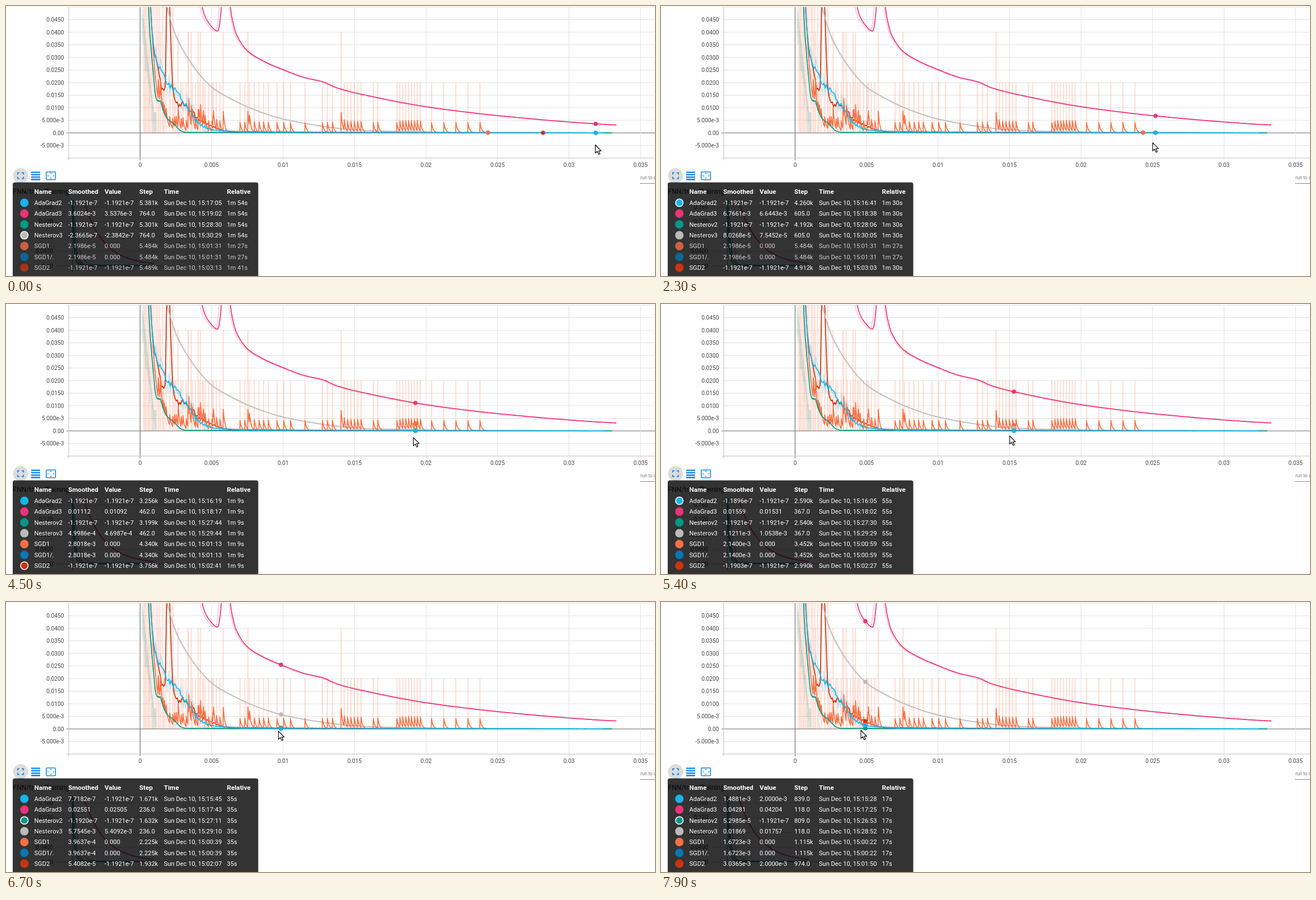
An HTML page that plays this animation: 1159x483 px, repeating every 8000 ms.

```html
<!DOCTYPE html>
<html lang="en">
<head>
<meta charset="utf-8">
<title>Training loss chart</title>
<style>
html, body { margin: 0; width: 100%; height: 100%; overflow: hidden; background: #fff; }
svg { display: block; width: 1159px; height: 483px; font-family: Roboto, Arial, sans-serif; }
.axis { font-size: 10.2px; fill: #444; }
.head { font-size: 11.7px; font-weight: 700; fill: #fff; }
.row { font-size: 11.1px; fill: #fff; }
.line { fill: none; stroke-linejoin: round; }
</style>
</head>
<body>
<svg id="stage" viewBox="0 0 1159 483"></svg>
<script>
const stage = document.getElementById('stage');
const X0 = 239.5, Y0 = 227, TICK_X = 127.67, TICK_Y = 22.5;
const PX_PER_SEC = 7.0925, PX_PER_UNIT = 4500;
const COL = { blue: '#14b6ee', pink: '#ee3377', teal: '#009988', gray: '#bbbbbb', orange: '#ff7043', navy: '#0077bb', red: '#cc3311' };

let seed = 11;
const rnd = () => (seed = (seed * 16807) % 2147483647) / 2147483647;
const lerp = (a, b, u) => a + (b - a) * u;
const pairs = s => s.trim().split(/\s+/).map(p => p.split(',').map(Number));

// Smooth curve through a few points, with optional jitter that fades near zero
function curve(pts, jitter = 0) {
  const out = [];
  const slope = i => {
    const a = pts[Math.max(0, i - 1)], b = pts[Math.min(pts.length - 1, i + 1)];
    return (b[1] - a[1]) / (b[0] - a[0]);
  };
  for (let i = 0; i < pts.length - 1; i++) {
    const [a, b] = [pts[i], pts[i + 1]];
    const w = b[0] - a[0], n = Math.max(6, Math.round(w / 2));
    for (let k = 0; k < n; k++) {
      const u = k / n, v = 1 - u;
      const y = a[1] * v * v * (1 + 2 * u) + b[1] * u * u * (3 - 2 * u) + w * u * v * (slope(i) * v - slope(i + 1) * u);
      out.push([a[0] + w * u, y + (rnd() - .5) * jitter * Math.min(1, Math.abs(Y0 - y) / 30)]);
    }
  }
  out.push(pts[pts.length - 1]);
  return out;
}

function yAt(pts, x) {
  const i = pts.findIndex(p => p[0] >= x);
  if (i <= 0) return pts[i < 0 ? pts.length - 1 : 0][1];
  const [a, b] = [pts[i - 1], pts[i]];
  return lerp(a[1], b[1], (x - a[0]) / (b[0] - a[0]));
}

// Loss readings of the two slow runs, which also shape their curves
const KEY_X = [1053, 957, 835.5, 731, 630.2, 491, 365];
const readings = (head, list) => curve([...pairs(head), ...list.map((v, i) => [KEY_X[i], Y0 - v * PX_PER_UNIT])]
  .sort((a, b) => a[0] - b[0]));

const pink = readings('347,-25 350.5,2 356,20 375,44 380,40 384.5,2 391,-100 400.8,2 405,28 412,52 430,79 460,98.5 530,127 567,136 590,146 1090,212.8',
  [3.6024e-3, 5.2323e-3, 7.9119e-3, .01112, .01559, .02551, .04281]);
const gray = readings('286,-8 288,2 297,35 310,67 335,108 400,165 440,184 565,215 1080,227',
  [-2.3665e-7, 6.0284e-5, 1.3203e-4, 4.9986e-4, 1.1211e-3, 5.7545e-3, .01869]);
const teal = curve(pairs('254,-10 257,50 262,108 268,165 276,170 284,196 300,211 314,224 340,226 1082.5,226.8'), 4);
const blue = curve(pairs('257,-12 261,48 267,90 287,135 303,152 320,176 340,205 365,220.3 395,223.5 440,226.4 1067,226.8'), 10);
const red = curve(pairs('257,-12 262,62 268,98 284,142 287,2 289.5,-14 292.5,4 298,150 320,176 346,204 365,213.3 385,222 430,225 959,226.8'), 9);

// Spikes: [x, size]; trains are first x, gap, count
const spikes = [[388, 2], [432, 2], [598.5, 2]];
for (let x = 272; x < 384; x += 1 + rnd() * 5.5) spikes.push([x, rnd() < .25 ? 2 : 1]);
for (const [x, gap, n] of [[418, 8.4, 7], [484, 12, 3], [534, 0, 1], [565, 9, 3], [604, 6, 6], [656, 8, 2], [698, 5.2, 9], [760, 21.6, 5]])
  for (let i = 0; i < n; i++) spikes.push([x + i * gap, 1]);
spikes.sort((a, b) => a[0] - b[0]);

// Each spike lifts the smoothed line, which then decays
const orange = [];
for (let x = 258, h = 0, i = 0; x <= 861; x += .5) {
  h *= Math.exp(-.5 / 2.8);
  while (i < spikes.length && spikes[i][0] <= x) h += 18 * spikes[i++][1];
  orange.push([x, Y0 - .3 - h - 240 * Math.exp((258 - x) / 10)]);
}

const path = (pts, color, extra = '') =>
  `<path class="line" d="M${pts.map(p => p[0].toFixed(1) + ' ' + p[1].toFixed(1)).join('L')}" stroke="${color}" stroke-width="1.7" ${extra}/>`;
const text = (x, y, s, cls, extra = '') => `<text x="${x}" y="${y}" class="${cls}" ${extra}>${s}</text>`;
const seg = (x1, y1, x2, y2, c, w = 1) => `<path d="M${x1} ${y1}L${x2} ${y2}" stroke="${c}" stroke-width="${w}"/>`;

function grid() {
  let s = '';
  for (let i = -2; i <= 10; i++) {
    const y = Y0 - i * TICK_Y, v = i * .005;
    s += seg(108, y, 1159, y, i ? '#e0e0e0' : '#999', i ? 1 : 1.4);
    const label = !i ? '0.00' : Math.abs(i) === 1 ? v.toExponential(3) : v.toFixed(4);
    if (i > -2 && i < 10) s += text(103.5, y + 3.6, label, 'axis', 'text-anchor="end"');
  }
  for (let i = -1; i <= 7; i++) {
    const x = X0 + i * TICK_X;
    s += seg(x, 2, x, 276, i ? '#e0e0e0' : '#888', i ? 1 : 1.5);
    if (i >= 0) s += text(x, 288, +(i * .005).toFixed(3), 'axis', 'text-anchor="middle"');
  }
  return s + seg(112, 2, 112, 276, '#ccc') + seg(108, 272, 1159, 272, '#ccc');
}

// Unsmoothed data, drawn pale
function faint() {
  let bars = spikes.map(([x, n]) => `M${x.toFixed(1)} 227V${n > 1 ? 47 : 137}`).join('');
  for (let x = 246; x < 300; x += 2 + rnd() * (x - 240) / 9) bars += `M${x.toFixed(1)} 227V2`;
  let wash = '';
  for (let x = 243; x < 268; x += .8) {
    const top = Math.min(190, (x - 243) * 9);
    wash += `M${x} ${top}V${Math.min(Y0, top + 15 + rnd() * 55)}`;
  }
  const haze = [];
  for (let x = 262; x < 480; x += 1.6) {
    const y = yAt(blue, x);
    haze.push([x, Math.min(Y0, y + (rnd() - .5) * Math.min(40, (Y0 - y) * 1.6 + 3))]);
  }
  const shift = (pts, c, dx) => path(pts, c, `opacity=".25" transform="translate(${dx} .3)"`);
  return `<path d="${bars}" stroke="${COL.orange}" stroke-width="2.2" opacity=".21"/>` +
    `<path d="${wash}" stroke="${COL.teal}" opacity=".22"/>` +
    path(haze, COL.blue, 'opacity=".25"') + shift(gray, COL.gray, -2) +
    shift(pink.filter(p => p[0] < 386), COL.pink, -4) + shift(pink.filter(p => p[0] > 398), COL.pink, -2.5);
}

// Small chart that shows dimly below the tooltip
function miniChart() {
  let s = text(12.5, 336, 'FNN/train/Training', '', 'font-size="12" fill="#222"');
  for (let i = 0; i < 5; i++) {
    const v = .16 - i * .04, y = 359.5 + i * 26.4;
    s += text(84, y + 3.5, v > .09 ? v.toFixed(3) : v > .01 ? v.toFixed(4) : '0.00', 'axis', 'text-anchor="end"');
    s += seg(91, y, 292, y, i < 4 ? '#ddd' : '#999');
  }
  s += seg(118.5, 347, 118.5, 476, '#888');
  const fall = (x, k, c, end) => {
    const pts = [];
    for (let u = 0; u <= end - x; u += 2) pts.push([x + u, 464 - 117 * Math.exp(-u / k)]);
    return path(pts, c);
  };
  return s + fall(120, 8, COL.gray, 262) + fall(119, 5, COL.orange, 224) + fall(119, 4, COL.blue, 262) +
    fall(118, 3, COL.teal, 262) + fall(138, 36, COL.pink, 264);
}

const icons = `<circle cx="26" cy="303.5" r="13.5" fill="#dcdcdc"/>
<g fill="none" stroke="#1e88e5" stroke-width="1.8">
<path d="M20.8 301.5V298.3H24M28 298.3H31.2V301.5M31.2 305.5V308.7H28M24 308.7H20.8V305.5"/>
<path d="M45 297.5H61M45 301.8H61M45 306.1H61M45 310.4H61" stroke-width="2.6"/>
<rect x="71.8" y="296.8" width="16.6" height="14" rx="1" stroke-width="1.6"/></g>
<path d="M78.2 300L80.1 297.8 82 300ZM78.2 307.6L80.1 309.8 82 307.6ZM75.8 302L73.6 303.8 75.8 305.6ZM84.4 302L86.6 303.8 84.4 305.6Z" fill="#1e88e5"/>`;

// step: [per second, offset]; clock: wall time at zero, in seconds after 15:00
const FLOOR = -1.1921e-7;
const height = (pts, x) => (Y0 - yAt(pts, x)) / PX_PER_UNIT;
const accuracy = v => v > 1e-3 ? 2e-3 : FLOOR;
const sgd1 = {
  col: COL.orange, pts: orange, clock: 4.33, end: 860.8, step: [62.5, 9],
  smooth: (s, x) => x > 860 ? 2.1986e-5 : height(orange, x), value: () => 0
};
const runs = [
  { name: 'AdaGrad2', col: COL.blue, pts: blue, clock: 910.4, step: [46.82, 11],
    smooth: s => FLOOR + 1.4881e-3 * Math.exp((17.695 - s) / 2.394), value: accuracy },
  { name: 'AdaGrad3', col: COL.pink, pts: pink, clock: 1027.87, step: [6.66, .3],
    smooth: (s, x) => height(pink, x), value: v => v * .982 },
  { name: 'Nesterov2', col: COL.teal, pts: teal, clock: 1595.6, lag: .05, step: [46.3, -10],
    smooth: s => FLOOR + 5.3092e-5 * Math.exp((17.695 - s) / 1.1), value: () => FLOOR },
  { name: 'Nesterov3', col: COL.gray, pts: gray, clock: 1714.87, step: [6.66, .3],
    smooth: (s, x) => height(gray, x), value: v => v * (v > 0 ? .94 : 1.0075) },
  { name: 'SGD1', ...sgd1 },
  { name: 'SGD1/.', ...sgd1, col: COL.navy },
  { name: 'SGD2', col: COL.red, pts: red, clock: 92.35, end: 959, step: [53.91, 20],
    smooth: s => FLOOR + 5.376e-3 * Math.exp(-1.031e-4 * s ** 3), value: accuracy }
];
const ACTIVE = [3, 0, 6, 6, 0, 2, 2];

const num = v => v === 0 ? '0.000' : Math.abs(v) >= .01 ? v.toPrecision(4) : v.toExponential(4);
const count = v => (v = Math.round(v)) >= 1000 ? (v / 1000).toFixed(3) + 'k' : v.toFixed(1);
const two = n => String(Math.floor(n)).padStart(2, '0');
const clock = s => `Sun Dec 10, 15:${two(s / 60)}:${two(s % 60)}`;
const span = s => (s >= 60 ? Math.floor(s / 60) + 'm ' : '') + Math.floor(s % 60) + 's';

const COLS = { Name: 50.5, Smoothed: 111, Value: 176, Step: 238, Time: 282, Relative: 394.5 };
const rowY = i => 352 + i * 19.35;
const tableRow = (r, i) => `<g id="row${i}"><circle cx="32.8" cy="${rowY(i)}" r="6.8" fill="${r.col}" stroke-width="1.5"/>` +
  Object.values(COLS).map((x, k) => text(x, rowY(i) + 4, k ? '' : r.name, 'row')).join('') + '</g>';

stage.innerHTML = `<defs><clipPath id="plot"><rect x="112" y="2" width="1047" height="270"/></clipPath></defs>
${grid()}<g clip-path="url(#plot)">${faint()}
${[red, gray, orange, teal, pink, blue].map(pts => path(pts, runs.find(r => r.pts === pts).col)).join('')}
${runs.map((r, i) => `<circle id="dot${i}" r="3.8" fill="${r.col}"/>`).reverse().join('')}</g>
${icons}${text(1133, 309.5, 'run to download', '', 'font-size="8.3" fill="#777"')}${seg(1132, 317.5, 1159, 317.5, '#888')}
${miniChart()}<rect x="12" y="315.5" width="438.5" height="172" rx="4" fill="#000" fill-opacity=".8"/>
${Object.entries(COLS).map(([h, x]) => text(x, 336, h, 'head')).join('')}${runs.map(tableRow).join('')}
<path id="cursor" d="M0 0V14.6L3.4 11.5 6 17 8.3 16 5.8 10.6H10.4Z" fill="#fff" stroke="#111" stroke-width="1.2" stroke-linejoin="round"/>`;

const rows = runs.map((r, i) => {
  const g = document.getElementById('row' + i);
  return { g, mark: g.querySelector('circle'), cells: [...g.querySelectorAll('text')], dot: document.getElementById('dot' + i) };
});
const cursor = document.getElementById('cursor');

// time, marker x
const TRACK = pairs('300,1053 1200,957 2100,892 3000,852 3300,835.5 3900,786 4500,731 4800,715 5400,630.2 5700,595 6700,491 7500,408 7900,365');
// time, pointer lead over the marker, pointer y
const POINTER = pairs('300,.5,248.5 1200,7.5,242.5 3300,3,246.5 4500,3.5,239 5400,7.5,236 6700,4.5,231 7900,8,229.5');

function along(track, t) {
  let i = 0;
  while (i < track.length - 2 && t >= track[i + 1][0]) i++;
  const [a, b] = [track[i], track[i + 1]];
  const u = Math.max(0, Math.min(1, (t - a[0]) / (b[0] - a[0])));
  return a.slice(1).map((v, k) => lerp(v, b[k + 1], u));
}

function draw(t) {
  const [x] = along(TRACK, t);
  const [lead, y] = along(POINTER, t);
  cursor.setAttribute('transform', `translate(${(x - lead).toFixed(1)} ${y.toFixed(1)})`);
  const active = ACTIVE[KEY_X.filter(k => k >= x).length - 1];
  runs.forEach((r, i) => {
    const { g, mark, cells, dot } = rows[i];
    const px = Math.min(x, r.end || x);
    const sec = (px - X0) / PX_PER_SEC;
    const v = r.smooth(sec, px);
    [num(v), num(r.value(v)), count(r.step[0] * sec + r.step[1]), clock(r.clock + sec), span(sec - (r.lag || 0))]
      .forEach((s, k) => cells[k + 1].textContent = s);
    g.setAttribute('opacity', px < x ? .75 : 1);
    mark.setAttribute('stroke', i === active ? '#fff' : r.col);
    dot.setAttribute('cx', px);
    dot.setAttribute('cy', yAt(r.pts, px));
  });
}

let last = -1;
const begin = performance.now();
function tick() {
  const t = Math.floor(((performance.now() - begin) % 8000) / 100) * 100;
  if (t !== last) draw(last = t);
  requestAnimationFrame(tick);
}
tick();
</script>
</body>
</html>
```
